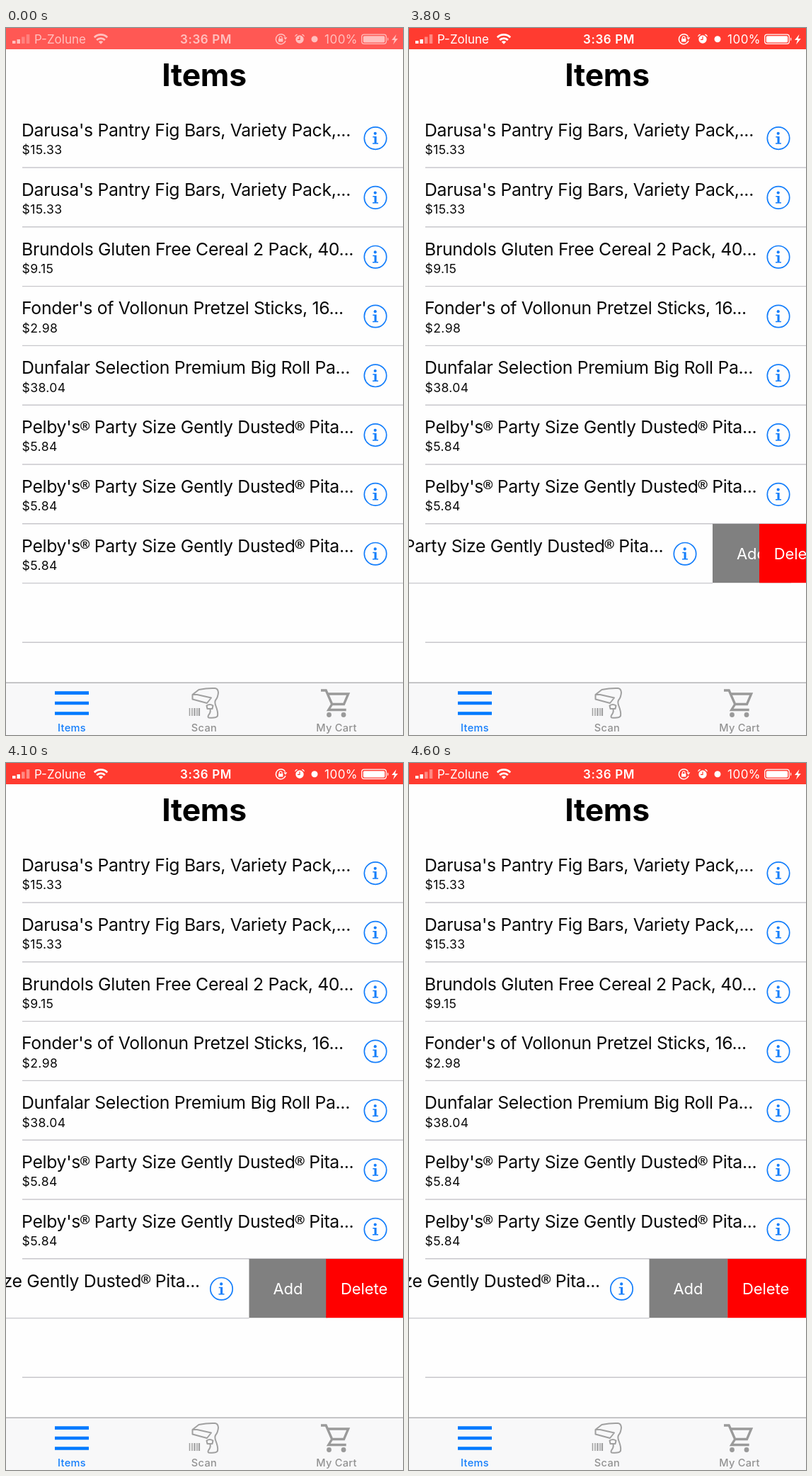
An HTML page for the animation above (5200 ms loop, 561 by 998 pixels).

```html
<!DOCTYPE html>
<html lang="en">
<head>
<meta charset="utf-8">
<title>Items</title>
<style>
  html, body { margin: 0; width: 100%; height: 100%; overflow: hidden; background: #fefefe; }
  svg { display: block; width: 561px; height: 998px; }
  text { font-family: Inter, Roboto, sans-serif; }
  .name { font-size: 24.8px; letter-spacing: -.32px; fill: #0a0a0a; }
  .mark { font: 18px "Liberation Sans", Arial, sans-serif; stroke: #0a0a0a; stroke-width: .35px; }
  .price { font-size: 17.6px; letter-spacing: .4px; fill: #0a0a0a; }
  .line { stroke: #c8c7cc; stroke-width: 1.4; }
  .action { font-size: 22px; letter-spacing: -.1px; fill: #fff; }
  .tab { font-size: 14.6px; font-weight: 500; letter-spacing: .3px; text-anchor: middle; }
  #status text { font-size: 17px; }
</style>
</head>
<body>
<svg viewBox="0 0 561 998">
  <defs>
    <g id="info">
      <circle r="15.7" fill="none" stroke="#147efb" stroke-width="1.7"/>
      <circle cx="-.3" cy="-6.8" r="2.1" fill="#147efb"/>
      <path d="M-3.7-2.5H1.6V6.7H4V8.2H-4V6.7H-1.5V-1H-3.7Z" fill="#147efb"/>
    </g>
  </defs>

  <rect id="bar" width="561" height="30" fill="#ff3b30"/>
  <g id="status" fill="#fff">
    <path d="M9 18h4.5v4H9zM15.5 16h4.5v6h-4.5z"/>
    <path d="M22 12.5h4.5V22H22zM28.8 9h4.5v13h-4.5z" opacity=".4"/>
    <text x="40" y="21.6">P-Zolune</text>
    <g fill="none" stroke="#fff" stroke-width="2.7">
      <path d="M124.8 13.2a13.2 13.2 0 0 1 18.4 0M128.2 17a8.3 8.3 0 0 1 11.6 0"/>
    </g>
    <path d="M134 22.8l-3.2-3.3a4.6 4.6 0 0 1 6.4 0z"/>
    <text x="282.5" y="21.6" text-anchor="middle" font-weight="600" letter-spacing=".6">3:36 PM</text>
    <path d="M394.6 12.5A7 7 0 1 0 395 18" fill="none" stroke="#fff" stroke-width="1.5"/>
    <path d="M392.3 13.2h5l-2.4 3.6zM385 15h6.4v4.6H385z"/>
    <path d="M386.3 15v-1.3a1.9 1.9 0 0 1 3.8 0V15" fill="none" stroke="#fff" stroke-width="1.2"/>
    <circle cx="415" cy="16" r="5.7"/>
    <path d="M408.3 12.6a3 3 0 0 1 4-3.5zM421.7 12.6a3 3 0 0 0-4-3.5z"/>
    <path d="M415 12.2V16.4H412" fill="none" stroke="#ff3b30" stroke-width="1.2"/>
    <circle cx="436" cy="15.8" r="4.5"/>
    <text x="450" y="21.6" letter-spacing=".5">100%</text>
    <rect x="502.7" y="9.2" width="34.6" height="13.2" rx="3.4" fill="none" stroke="#fff" stroke-width="1.3"/>
    <rect x="504.8" y="11.2" width="30.4" height="9.2" rx="1.6"/>
    <path d="M539 13.3a3 3 0 0 1 0 5z"/>
    <path d="M551.5 9l-6.5 8h4l-2 6.3 6.8-8.4h-4z"/>
  </g>

  <text x="280" y="81.7" text-anchor="middle" font-size="44.5" font-weight="700" letter-spacing="-.3">Items</text>
  <g id="list"></g>
  <path class="line" d="M23 867.3H561"/>

  <g id="add">
    <rect y="700" width="111" height="83.2" fill="#808080"/>
    <text class="action" x="34" y="750.2">Add</text>
  </g>
  <g id="delete">
    <rect y="700" width="111" height="83.2" fill="#f00"/>
    <text class="action" x="20.8" y="750.2">Delete</text>
  </g>

  <rect y="924" width="561" height="74" fill="#f8f8f9"/>
  <path d="M0 924.3H561" stroke="#b4b4b7" stroke-width="1.4"/>
  <path d="M69 938.6h48M69 953h48M69 967.5h48" stroke="#007aff" stroke-width="4.6"/>
  <text class="tab" x="93" y="993" fill="#147efb">Items</text>
  <g fill="none" stroke="#a0a0a0" stroke-width="2" stroke-linejoin="round">
    <path d="M263.5 941l9-7q12-2.5 23-2q4 .5 4.5 6q-.5 7-4 11q-1.500 3 .5 8q3.500 9 2.500 14q-2 3.500-12.500 2.500q-2-1 0-4q3-3.500 2-8"/>
    <path d="M263.500 941v6.500l20.500 5.500l6-7.500l-20-4.500z"/>
    <path d="M283.500 956.500q4.500-3 9 0l-1 4.500h-7z"/>
    <path d="M259.500 960v11M263 960v11M270 960v11" stroke-width="1.5"/>
    <path d="M266.500 960v11M273 960v11" stroke-width="2.2"/>
  </g>
  <text class="tab" x="280" y="993" fill="#929292">Scan</text>
  <g fill="none" stroke="#9a9a9a" stroke-width="3.3">
    <path d="M445 935h7.200l8.500 19.500h16.800l6.200-14.500h-29"/>
    <path d="M460.700 954.500l-5 8h25"/>
  </g>
  <g fill="#9a9a9a">
    <circle cx="456.500" cy="969.500" r="3.4"/>
    <circle cx="477" cy="969.500" r="3.4"/>
  </g>
  <text class="tab" x="467" y="993" fill="#929292">My Cart</text>
</svg>

<script>
  const $ = id => document.getElementById(id);
  const bars = ["Darusa's Pantry Fig Bars, Variety Pack,...", "$15.33"];
  const pita = ["Pelby's® Party Size Gently Dusted® Pita...", "$5.84"];
  const items = [
    bars, bars,
    ["Brundols Gluten Free Cereal 2 Pack, 40...", "$9.15"],
    ["Fonder's of Vollonun Pretzel Sticks, 16...", "$2.98"],
    ["Dunfalar Selection Premium Big Roll Pa...", "$38.04"],
    pita, pita, pita
  ];

  const raised = '<tspan class="mark" dy="-4.5">®</tspan><tspan dy="4.5">&#8203;</tspan>';
  $("list").innerHTML = items.map(([name, price], i) => {
    const y = 83.8 * i;
    return `<g>
      <text class="name" x="22" y="${153 + y}">${name.replaceAll("®", raised)}</text>
      <text class="price" x="22.5" y="${178.3 + y}">${price}</text>
      <use href="#info" x="522" y="${155.6 + y}"/>
      <path class="line" d="M23 ${197 + y}H561"/>
    </g>`;
  }).join("");
  const lastRow = $("list").lastElementChild;

  // Swipe distance in px, one value per 100 ms.
  const swipe = [44, 132, 187, 211, 217.5, 220, 220.6, 221, 221.3, 221.5];
  const shift = (el, x) => el.setAttribute("transform", `translate(${x} 0)`);

  function draw(now) {
    const step = Math.floor(now % 5200 / 100);
    const k = step - 37;
    const dx = k < 0 ? 0 : swipe[Math.min(k, swipe.length - 1)];
    shift(lastRow, -dx);
    shift($("add"), 561 - dx);
    shift($("delete"), 561 - dx / 2);

    const fade = Math.max(0, 1 - step / 2);
    $("bar").setAttribute("fill", `rgb(255 ${59 + 29 * fade} ${48 + 36 * fade})`);
    $("status").setAttribute("opacity", 1 - .38 * fade);
    requestAnimationFrame(draw);
  }
  draw(performance.now());
</script>
</body>
</html>
```
